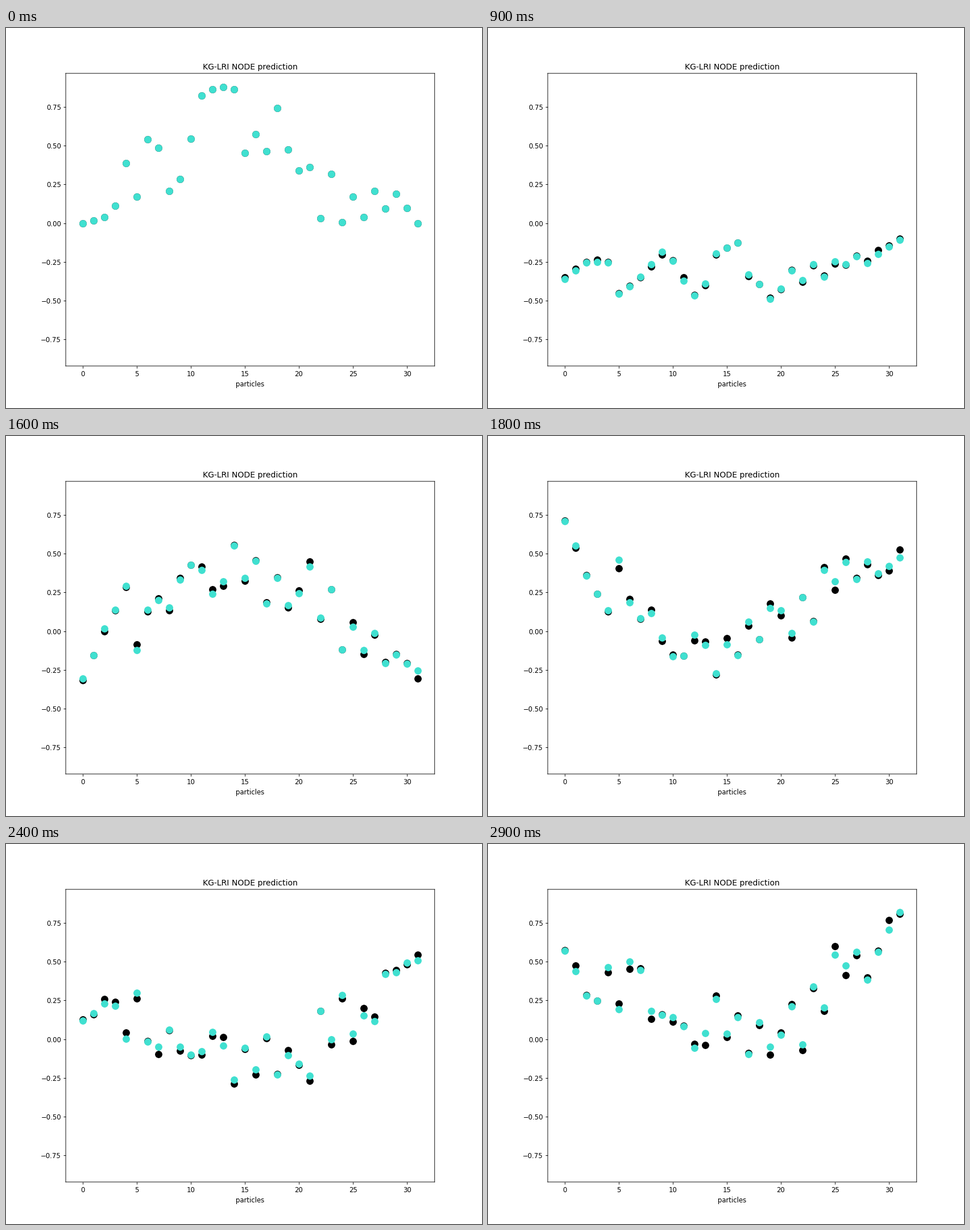
Animation of 837x669 px, one loop 3000 ms. Source, as a matplotlib script:

```python
import numpy as np
import matplotlib.pyplot as plt
from matplotlib.animation import FuncAnimation

DPI = 83.7
SIZE = (10, 7.993)  # inches, 837 x 669 pixels
FRAMES, INTERVAL = 30, 100
N = 32
ERROR = 0.045  # spread of the prediction error at the end of the loop

plt.rcParams["path.snap"] = False

# Heights of the particles at rest, before they are released.
start = np.array([0, 18, 39, 114, 387, 171, 541, 488, 206, 283, 545,
                  824, 863, 881, 866, 455, 575, 466, 745, 475, 338,
                  363, 33, 318, 6, 171, 37, 206, 94, 191, 97, 0]) / 1000

x = np.arange(N)
k = np.arange(N)
t = np.arange(FRAMES)[:, None]

# Standing waves of a chain with free ends, one per row.
waves = np.cos(np.pi * np.outer(k, x + 0.5) / N)
waves /= np.linalg.norm(waves, axis=1, keepdims=True)

# Long-range coupling: a small gap above the uniform swing, then a rise
# to an almost flat band of fast waves.
omega = np.sqrt(1.219 + 0.12 * (k > 0) + 2.49 * (1 - np.exp(-(k / 9) ** 2)))

predicted = (np.cos(omega * t) * (waves @ start)) @ waves

# The two chains agree at first and slowly drift apart.
rng = np.random.default_rng(4)
drift = rng.normal(0, ERROR, N) * t / (FRAMES - 1)
phase = rng.uniform(0, 2 * np.pi, N)
actual = predicted + (drift * np.cos(omega * t + phase)) @ waves

fig = plt.figure(figsize=SIZE, dpi=DPI)
ax = fig.add_axes([0.1255, 0.1106, 0.775, 0.77])
ax.set_title("KG-LRI NODE prediction")
ax.set_xlabel("particles")
ax.set_xlim(-1.55, 32.55)
ax.set_ylim(-0.923, 0.968)


def dots(heights, color):
    return ax.scatter(x, heights[0], s=100, color=color)


layers = [(dots(actual, "black"), actual),
          (dots(predicted, "turquoise"), predicted)]


def update(frame):
    for artist, heights in layers:
        artist.set_offsets(np.column_stack([x, heights[frame]]))
    return [artist for artist, _ in layers]


anim = FuncAnimation(fig, update, frames=FRAMES, interval=INTERVAL,
                     repeat=True, repeat_delay=0)
plt.show()
```
